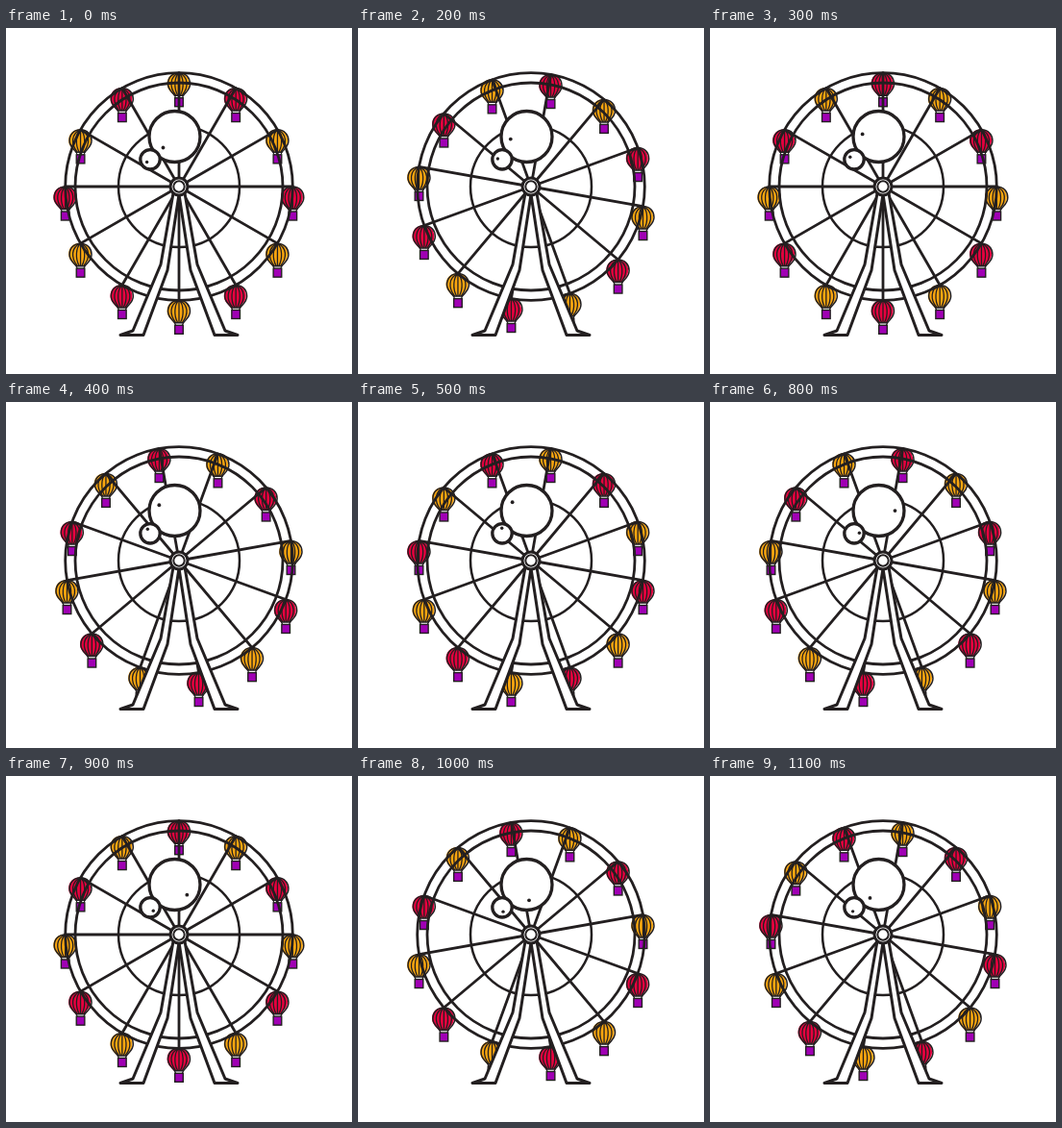
Recreate the animation shown at these times as an HTML page. Size 360x360 px, loop 1.2 s.

```html
<!DOCTYPE html>
<html lang="en">
<head>
<meta charset="utf-8">
<title>Balloon wheel</title>
<style>
html, body { margin: 0; width: 100%; height: 100%; overflow: hidden; background: #fff; }
svg { display: block; width: 100vw; height: 100vh; }
</style>
</head>
<body>
<svg viewBox="0 0 360 360" fill="none" stroke="#231f20" stroke-linejoin="round" stroke-linecap="round">
  <defs>
    <path id="skin" stroke="none" d="M0 0C-7 0-11.5 5-11.5 11.5C-11.5 17.500-7 20-4.500 23.500H4.500C7 20 11.500 17.500 11.500 11.500C11.500 5 7 0 0 0Z"/>
    <g id="rigging" stroke-width="1.500">
      <path d="M0 0C-7 0-11.500 5-11.500 11.500C-11.500 17.500-7 20-4.500 23.500H4.500C7 20 11.500 17.500 11.500 11.500C11.500 5 7 0 0 0Z"/>
      <path d="M0 0V23M0 0C-5 4-5.500 16-1.500 23M0 0C5 4 5.500 16 1.500 23M0 0C-10 4-10 15-3.500 23M0 0C10 4 10 15 3.500 23" stroke-width="1.300"/>
      <path d="M-4.500 23.500L-3.500 26M4.500 23.500L3.500 26" stroke-width="1.200"/>
      <rect x="-4.300" y="26" width="8.600" height="9" fill="#a000b4" stroke-width="1.400" stroke-linejoin="miter"/>
    </g>
    <path id="leg" fill="#fff" stroke-width="3" d="M174 172L161 246L132 315L119 319.500H143L168 252L180 173"/>
  </defs>
  <g id="cars"></g>
  <g stroke-width="2.800">
    <circle cx="180" cy="165" r="118.300"/>
    <circle cx="180" cy="165" r="108"/>
    <circle cx="180" cy="165" r="63" stroke-width="2.500"/>
    <path id="spokes"/>
  </g>
  <use href="#leg"/>
  <use href="#leg" transform="translate(360 0) scale(-1 1)"/>
  <g fill="#fff">
    <circle cx="180" cy="165" r="9" stroke-width="3"/>
    <circle cx="180" cy="165" r="5.700" stroke-width="2"/>
    <circle cx="175.500" cy="113" r="26.500" stroke-width="3.300"/>
    <circle cx="150" cy="136.800" r="10.200" stroke-width="3.300"/>
  </g>
  <g fill="#231f20" stroke="none">
    <circle id="bigDot" r="1.900"/>
    <circle id="smallDot" r="1.700"/>
  </g>
</svg>
<script>
const LOOP = 1200, STEP = 100, SEATS = 12, RADIUS = 118.3;
const HUB = { x: 180, y: 165 };
const $ = id => document.getElementById(id);

// Compass bearings in degrees, as [step, bearing] keys.
const dots = [
  { el: $('bigDot'), x: 175.5, y: 112.5, r: 17,
    keys: [[0, 225], [3, 277], [5, 299], [6, 351], [8, 452], [9, 491], [11, 572], [12, 585]] },
  { el: $('smallDot'), x: 150.4, y: 136.2, r: 5,
    keys: [[0, 229], [3, 293], [5, 352], [6, 386], [8, 450], [9, 505], [11, 561], [12, 589]] }
];

function around(c, r, degrees) {
  const a = degrees * Math.PI / 180;
  return { x: c.x + r * Math.sin(a), y: c.y - r * Math.cos(a) };
}

function sample(keys, step) {
  const i = keys.findIndex(k => k[0] > step);
  const [s0, v0] = keys[i - 1], [s1, v1] = keys[i];
  return v0 + (v1 - v0) * (step - s0) / (s1 - s0);
}

const place = (el, p) => el.setAttribute('transform', `translate(${p.x} ${p.y})`);

for (let i = 0; i < SEATS; i++) {
  const color = i % 2 ? '#e8003f' : '#faa60f';
  $('cars').innerHTML += `<g><use href="#skin" x="-0.9" y="-0.3" fill="${color}"/><use href="#rigging"/></g>`;
}
const cars = [...$('cars').children];

function render(time) {
  const step = Math.floor(time % LOOP / STEP);
  let d = '';
  cars.forEach((car, i) => {
    const angle = i * 360 / SEATS - step * 10;
    const rim = around(HUB, RADIUS, angle);
    place(car, rim);
    d += `M${HUB.x} ${HUB.y}L${rim.x} ${rim.y}`;
  });
  $('spokes').setAttribute('d', d);
  for (const dot of dots) place(dot.el, around(dot, dot.r, sample(dot.keys, step)));
}

const start = performance.now();
function tick() {
  render(performance.now() - start);
  requestAnimationFrame(tick);
}
render(0);
requestAnimationFrame(tick);
</script>
</body>
</html>
```
